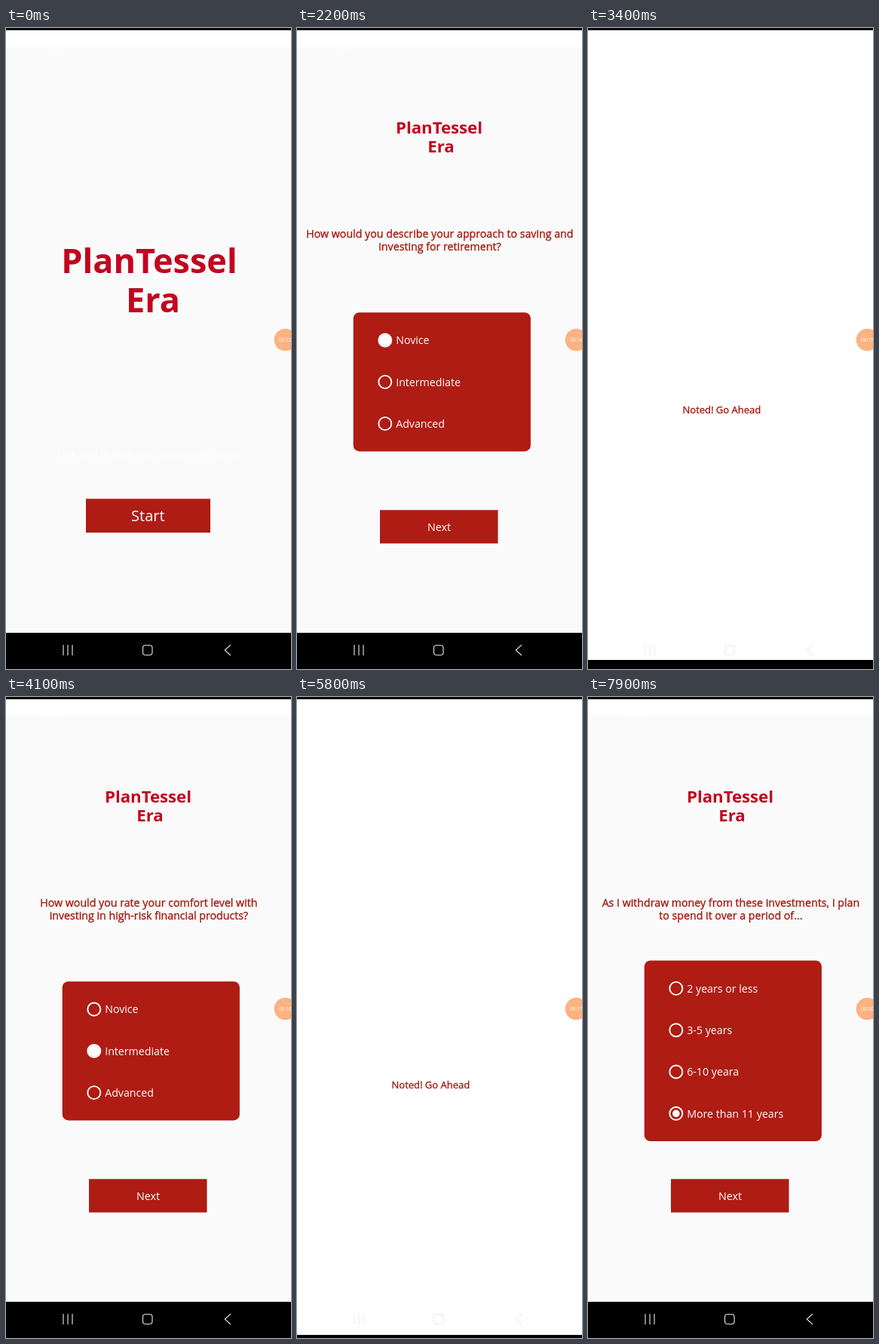
An HTML page for the animation above (8000 ms loop, 378 px wide and 850 px high).

```html
<!DOCTYPE html>
<html lang="en">
<head>
<meta charset="utf-8">
<title>Risk questionnaire</title>
<style>
html, body { margin: 0; width: 100%; height: 100%; overflow: hidden; background: #000; }
svg { display: block; width: 378px; height: 850px; font-family: "Open Sans", "Noto Sans", sans-serif; }
</style>
</head>
<body>
<svg id="stage" viewBox="0 0 378 850" xmlns="http://www.w3.org/2000/svg">
  <defs><clipPath id="reveal"><rect id="window" width="378" height="850"/></clipPath></defs>
  <rect width="378" height="850"/>
  <g id="pages"></g>
  <g id="nav"></g>
  <rect width="378" height="3"/>
  <rect y="846" width="378" height="4"/>
  <circle id="bubble" cx="370.5" cy="413.5" r="14.8"/>
  <text id="clock" x="362" y="416" font-size="6.5" fill="#fff"></text>
</svg>
<script>
const LOOP = 8000;
const RED = '#ae1c14';
const INK = '#a61a12';
const TITLE = '#c2061f';
const $ = id => document.getElementById(id);
const clamp = v => Math.max(0, Math.min(1, v));
const easeOut = u => 1 - (1 - u) ** 3;

const rect = (x, y, w, h, fill, r = 0) =>
  `<rect x="${x}" y="${y}" width="${w}" height="${h}" rx="${r}" fill="${fill}"/>`;

const text = (str, x, y, size, fill, extra = '') =>
  `<text x="${x}" y="${y}" font-size="${size}" fill="${fill}" ${extra}>${str}</text>`;

const centered = (str, x, y, size, fill, extra = '') =>
  text(str, x, y, size, fill, 'text-anchor="middle" ' + extra);

const medium = `stroke="${INK}" stroke-width=".35"`;
const bold = 'font-weight="700"';

const base = () =>
  rect(0, 3, 378, 843, '#fafafa') + rect(0, 3, 378, 22.5, '#fff') +
  text('11:20', 50, 29, 9, '#fff') + rect(0, 802, 378, 44, '#000');

function startPage() {
  return base() +
    centered('PlanTessel', 190, 325, 45, TITLE, bold) +
    centered('Era', 195, 377, 45, TITLE, bold) +
    centered('Click Start to begin your assessment survey', 188, 569, 12, '#fff') +
    rect(106, 624.3, 165, 44.9, RED) +
    centered('Start', 188.3, 654.3, 20, '#fff');
}

function questionPage(id, lines, options, picked) {
  const height = options.length * 55.3 + 18.4;
  const top = 469.3 - height / 2;
  const rows = options.map((label, i) => {
    const y = top + 36.9 + i * 55.3;
    const dot = i === picked ? `<circle id="${id}" cx="116.8" cy="${y}" r="0" fill="#fff"/>` : '';
    return `<circle cx="116.8" cy="${y}" r="8.5" fill="none" stroke="#fff" stroke-width="1.9"/>` +
      dot + text(label, 131.2, y + 5.4, 14.2, '#fff');
  });
  return base() +
    centered('PlanTessel', 188.5, 139.8, 22.2, TITLE, bold) +
    centered('Era', 191, 165, 22.2, TITLE, bold) +
    lines.map((line, i) => centered(line, 189.4, 277.5 + i * 17.8, 14.2, INK, medium)).join('') +
    rect(74.7, top, 235.2, height, RED, 8) + rows.join('') +
    rect(110, 639.2, 156.5, 44.3, RED) +
    centered('Next', 188.5, 667, 14.3, '#fff');
}

const notedPage = () =>
  rect(0, 3, 378, 843, '#fff') + text('Noted! Go Ahead', 125.5, 519, 13, INK, medium);

const levels = ['Novice', 'Intermediate', 'Advanced'];
const periods = ['2 years or less', '3-5 years', '6-10 yeara', 'More than 11 years'];

// Each page opens over the one before it.
const pages = [
  { at: -1000, span: 1, html: startPage() },
  { at: 144, span: 550, html: questionPage('dot1',
    ['How would you describe your approach to saving and', 'investing for retirement?'], levels, 0) },
  { at: 2250, span: 550, html: notedPage() },
  { at: 3315, span: 450, html: questionPage('dot2',
    ['How would you rate your comfort level with', 'investing in high-risk financial products?'], levels, 1) },
  { at: 4750, span: 550, html: notedPage() },
  { at: 5800, span: 450, html: questionPage('dot3',
    ['As I withdraw money from these investments, I plan', 'to spend it over a period of...'], periods, 3) }
];

const picks = [
  { id: 'dot1', at: 1300, r: 7.8 },
  { id: 'dot2', at: 3900, r: 7.8 },
  { id: 'dot3', at: 6550, r: 4.8 }
];

$('pages').innerHTML = pages.map(p => `<g><g>${p.html}</g></g>`).join('');
pages.forEach((p, i) => {
  p.outer = $('pages').children[i];
  p.inner = p.outer.firstChild;
});

const icons = 'M76 818V832M82 818V832M88 818V832' +
  'M185 818.5H190.5Q194 818.5 194 822V828Q194 831.5 190.5 831.5H185Q181.5 831.5 181.5 828V822Q181.5 818.5 185 818.5Z' +
  'M298 818L290.3 825L298 832';
$('nav').innerHTML =
  `<path d="${icons}" fill="none" stroke="#000" stroke-opacity=".07" stroke-width="2.6"/>` +
  `<path d="${icons}" fill="none" stroke-width="1.2"/>`;
const navLine = $('nav').lastChild;

function place(page, shown, shift, alpha, clipped) {
  page.outer.style.display = shown ? '' : 'none';
  page.outer.setAttribute('opacity', alpha);
  page.inner.setAttribute('transform', `translate(0 ${shift})`);
  if (clipped) page.outer.setAttribute('clip-path', 'url(#reveal)');
  else page.outer.removeAttribute('clip-path');
}

function draw(t) {
  let top = 0;
  pages.forEach((p, i) => { if (t >= p.at) top = i; });
  const u = clamp((t - pages[top].at) / pages[top].span);
  const p = easeOut(u);
  const moving = u < 1;
  pages.forEach((page, i) => {
    if (i === top) place(page, true, 140 * (1 - p), clamp((u - 0.2) / 0.0875), moving);
    else place(page, moving && i === top - 1, -17 * p, 1, false);
  });
  $('window').setAttribute('y', 3 + 255 * (1 - p));

  picks.forEach(k => $(k.id).setAttribute('r', k.r * easeOut(clamp((t - k.at) / 250))));

  // Icons turn white where the bar behind them is light.
  const seen = u > 0.24 ? top : top - 1;
  const light = seen === 2 || seen === 4;
  navLine.setAttribute('stroke', light ? '#fff' : '#d8d8d8');

  $('bubble').setAttribute('fill', t >= 4700 && t < 5300 ? '#fdae6c' : '#fdb281');
  $('clock').textContent = '00:' + (12 + Math.floor((t + 100) / 1000));
}

function tick() {
  draw(performance.now() % LOOP);
  requestAnimationFrame(tick);
}
tick();
</script>
</body>
</html>
```
